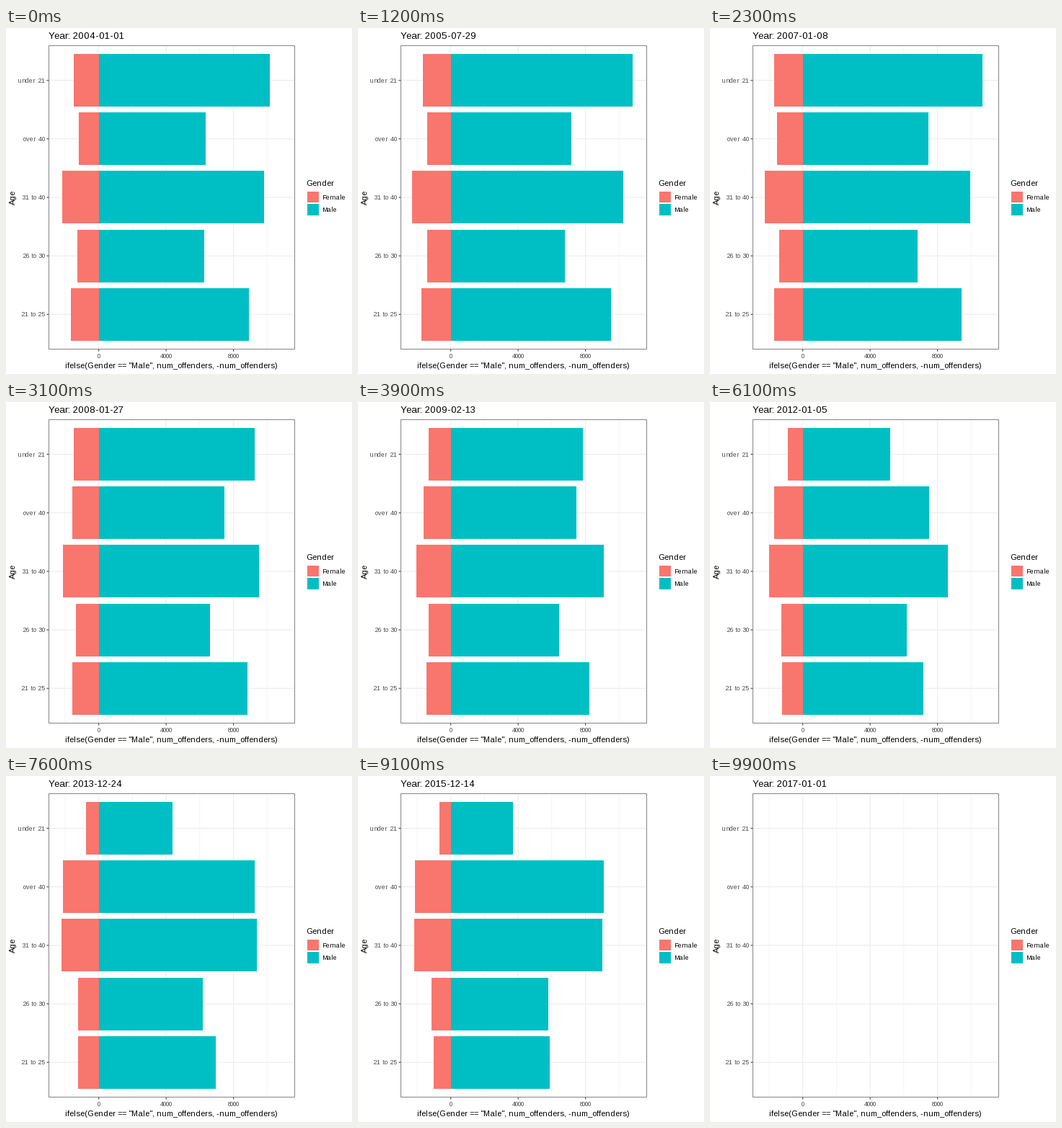
These frames come from a looping animation (480x480 px, 10000 ms). A matplotlib script:

```python
import matplotlib.pyplot as plt
import numpy as np
from matplotlib.animation import FuncAnimation
from matplotlib.patches import Rectangle

SIZE, DPI = 480, 72
FRAMES, INTERVAL = 100, 100
LAST = FRAMES - 1
LEFT, RIGHT, TOP, BOTTOM = 59.5, 400.5, 24.5, 445.5
ZERO, UNIT = 128.7, 93.45 / 4000
STEP, BAR, KEY = 81.15, 73.0, 15.86
SALMON, TEAL = "#F8766D", "#00BFC4"
GRID, DARK, LABEL = "#EBEBEB", "#333333", "#4D4D4D"

START = np.datetime64("2004-01-01")
DAYS = int((np.datetime64("2017-01-01") - START).astype(int))

# Per age group: male counts at the turning points, and the ratio of
# female to male offenders at the start, middle and end
TURNS = [0, 23, 39, 61, 76, LAST]
GROUPS = {
    "under 21": ([10150, 10665, 7845, 5190, 4375, 3325], [.148, .170, .180]),
    "over 40": ([6345, 7455, 7455, 7500, 9255, 8995], [.187, .228, .234]),
    "31 to 40": ([9815, 9940, 9085, 8615, 9385, 8795], [.223, .227, .243]),
    "26 to 30": ([6260, 6815, 6430, 6175, 6175, 5585], [.204, .208, .197]),
    "21 to 25": ([8915, 9430, 8230, 7160, 6945, 5305], [.185, .175, .173]),
}

plt.rcParams["font.family"] = "Liberation Sans"
plt.rcParams["text.hinting"] = "force_autohint"
plt.rcParams["text.hinting_factor"] = 1

fig = plt.figure(figsize=(SIZE / DPI, SIZE / DPI), dpi=DPI, facecolor="white")
ax = fig.add_axes([0, 0, 1, 1])
ax.set_xlim(0, SIZE)
ax.set_ylim(SIZE, 0)
ax.axis("off")


def px(value):
    return ZERO + value * UNIT


def line(x0, y0, x1, y1, color, width=1.07):
    ax.plot([x0, x1], [y0, y1], color=color, lw=width, zorder=1,
            solid_capstyle="butt", snap=False)


def text(x, y, s, size, color="black", ha="left", **kw):
    return ax.text(x, y, s, fontsize=size, color=color, ha=ha,
                   va="baseline", **kw)


def box(x, y, w, h, color):
    patch = Rectangle((x, y), w, h, fc=color, ec="none", lw=0,
                      zorder=3, snap=True)
    return ax.add_patch(patch)


def counts(i, male, ratio):
    surge = np.interp(i, [0, 15, 23], [1, 1.045, 1])
    m = np.interp(i, TURNS, male) * surge
    return m, m * np.interp(i, [0, LAST / 2, LAST], ratio)


# Grid, ticks and tick labels
for v in range(-2000, 10001, 4000):
    line(px(v), TOP, px(v), BOTTOM, GRID, 0.53)
centers = [72.65 + STEP * i for i in range(len(GROUPS))]
for y, name in zip(centers, GROUPS):
    line(LEFT, y, RIGHT, y, GRID)
    line(56.5, y, 59.2, y, DARK)
    text(54, y + 3.1, name, 8.8, LABEL, "right")
for v in range(0, 8001, 4000):
    line(px(v), TOP, px(v), BOTTOM, GRID)
    line(px(v), 445.8, px(v), 448.5, DARK)
    text(px(v), 458, str(v), 8.8, LABEL, "center")

ax.add_patch(Rectangle((LEFT, TOP), RIGHT - LEFT, BOTTOM - TOP, fill=False,
                       ec="#858585", lw=1, zorder=5, snap=False))

# Titles and legend
title = text(59, 15, "", 13.2)
text(229.5, 472, 'ifelse(Gender == "Male", num_offenders, -num_offenders)',
     11, ha="center")
text(13, 234.8, "Age", 11, ha="center", rotation=90, rotation_mode="anchor")
text(416.5, 219, "Gender", 11)
for y, color, name in ((226.55, SALMON, "Female"), (243.83, TEAL, "Male")):
    box(418, y, KEY, KEY, color)
    text(439.4, y + 11.2, name, 8.8)

males = [box(ZERO, y - BAR / 2, 0, BAR, TEAL) for y in centers]
females = [box(ZERO, y - BAR / 2, 0, BAR, SALMON) for y in centers]


def update(i):
    title.set_text(f"Year: {START + DAYS * i // LAST}")
    for m, f, group in zip(males, females, GROUPS.values()):
        male, female = counts(i, *group)
        m.set_width(male * UNIT)
        f.set_width(-female * UNIT)
        # The bars vanish at the very end of the loop
        m.set_visible(i < LAST)
        f.set_visible(i < LAST)
    return [title, *males, *females]


anim = FuncAnimation(fig, update, frames=FRAMES, interval=INTERVAL,
                     repeat=True, repeat_delay=0, blit=False)
plt.show()
```
